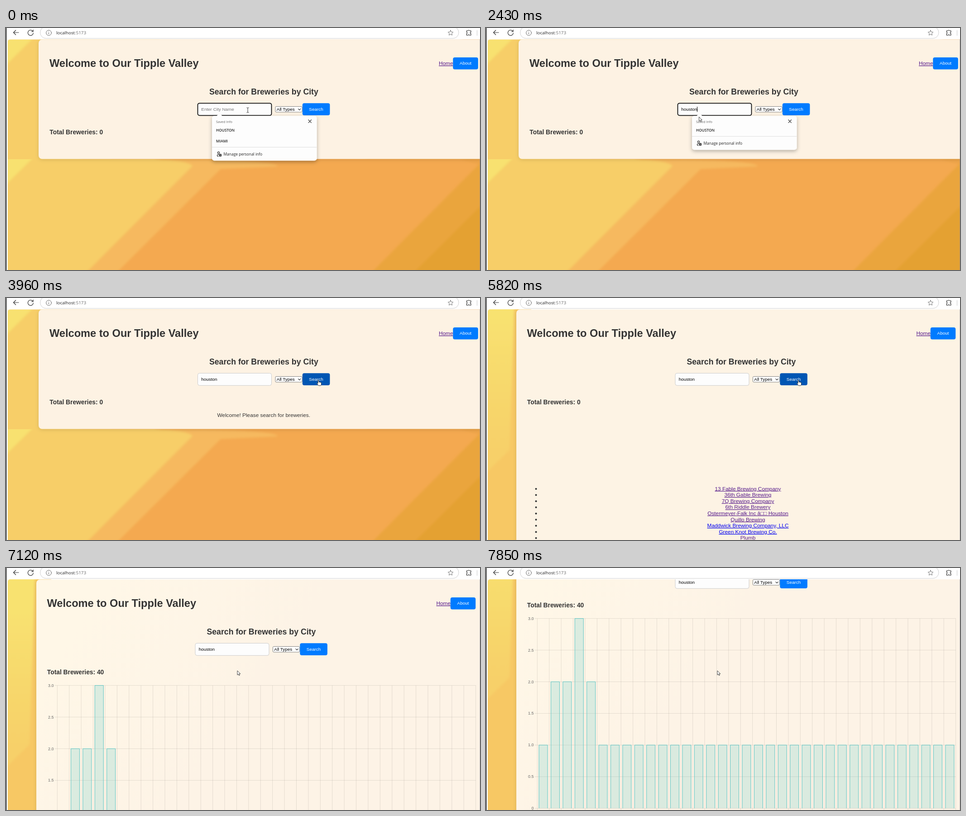
Animation of 1047x535 px, one loop 8 s. Source, as an HTML page:

```html
<!DOCTYPE html>
<html lang="en">
<head>
<meta charset="utf-8">
<title>Brewery search</title>
<style>
  html, body { margin: 0; width: 100%; height: 100%; overflow: hidden; background: #fff; }
  svg { display: block; width: 100vw; height: 100vh; }
  text { font: 9.9px "Liberation Sans", Arial, sans-serif; fill: #333; white-space: pre; }
  .h1 { font-size: 23.6px; font-weight: bold; }
  .h2 { font-size: 17.7px; font-weight: bold; }
  .h3 { font-size: 13.8px; font-weight: bold; }
  .body { font-size: 11.83px; }
  .mid { text-anchor: middle; }
  .link { text-decoration: underline; fill: #551a8b; }
  .new { fill: #0000ee; }
  .form { fill: #000; }
  .btn { fill: #fff; text-anchor: middle; }
  .tick { font-size: 8.85px; fill: #666; text-anchor: end; }
  .ui { font-family: "Open Sans", "Noto Sans", sans-serif; font-size: 8.45px; fill: #222; }
  .strong { font-size: 8.3px; font-weight: 600; }
  .line { fill: none; stroke: #333; stroke-width: 1.2; stroke-linecap: round; stroke-linejoin: round; }
  #bars path { fill: #4bc0c0; fill-opacity: .2; stroke: #4bc0c0; stroke-width: .9; }
</style>
</head>
<body>
<svg viewBox="0 0 1047 535" preserveAspectRatio="none">
  <defs>
    <clipPath id="view"><path d="M4 535V31q0-6 6-6H1047V535z"/></clipPath>
    <clipPath id="tileClip"><path d="M4 290H1047V554.5H4z"/></clipPath>
    <filter id="soft" x="-10%" y="-10%" width="120%" height="120%"><feGaussianBlur stdDeviation="2.5"/></filter>
    <filter id="shade" x="-10%" y="-20%" width="120%" height="150%">
      <feDropShadow dx="0" dy="3" stdDeviation="4" flood-opacity=".3"/>
    </filter>
    <filter id="glow" x="-5%" y="-5%" width="110%" height="110%">
      <feDropShadow dx="0" dy="2" stdDeviation="4" flood-opacity=".12"/>
    </filter>
    <linearGradient id="sun" gradientUnits="userSpaceOnUse" x1="0" y1="90" x2="0" y2="390">
      <stop stop-color="#f8e270"/><stop offset="1" stop-color="#f7d069"/>
    </linearGradient>
    <linearGradient id="paper" gradientUnits="userSpaceOnUse" x1="90" y1="200" x2="450" y2="450">
      <stop stop-color="#fff7e7"/><stop offset="1" stop-color="#fdf3e6"/>
    </linearGradient>
    <g id="tile" clip-path="url(#tileClip)">
      <path d="M4 290H1047V555H4z" fill="#f4a950"/>
      <g filter="url(#soft)">
        <path d="M-20 260H340V290Q600 291 600 306L474 312L210 575H-20z" fill="#f6b95e"/>
        <path d="M-20 260H330V290Q402 293 412 305L143 575H-20z" fill="#f7ce67"/>
        <path d="M-20 260H87L-20 366z" fill="#f8e16f"/>
        <path d="M1000 260H1080V312L1047 303L1005 290z" fill="#efa548"/>
        <path d="M1080 266L773 575H1080z" fill="#eaa53c"/>
        <path d="M1080 362L866 575H1080z" fill="#e4a131"/>
      </g>
    </g>
  </defs>

  <path d="M0 0H1047V535H0z" fill="#fff"/>
  <g clip-path="url(#view)">
    <g id="shortPage">
      <use href="#tile" y="-264.5"/><use href="#tile"/>
      <rect x="72" y="25.5" width="990" height="264" rx="8" fill="#fdf2e3" filter="url(#glow)"/>
    </g>
    <g id="scroller">
      <g id="tallPage">
        <g id="strip">
          <path d="M0-80H100V900H0z" fill="#f7c864"/>
          <path d="M-20-80H66L64 25L52 390L-20 460z" fill="url(#sun)" filter="url(#soft)"/>
        </g>
        <rect id="sheet" x="67" y="25.5" width="1000" height="900" rx="8" filter="url(#glow)"/>
      </g>
      <g id="content">
        <text class="h1" x="96" y="86">Welcome to Our Tipple Valley</text>
        <text class="body link" x="956" y="82">Home</text>
        <rect x="987.3" y="65" width="55.5" height="26.6" rx="4" fill="#007bff"/>
        <text class="btn" x="1015" y="81">About</text>
        <text class="h2 mid" x="569.4" y="147">Search for Breweries by City</text>
        <rect id="field" x="423.5" y="166.3" width="163" height="27" rx="4"/>
        <text id="typed" x="431.3" y="183"></text>
        <path id="caret" d="M466.5 174V185.5" stroke="#000"/>
        <rect x="595" y="173.5" width="59" height="12.5" rx="2" fill="#fff" stroke="#767676" stroke-width=".9"/>
        <text class="form" x="597.8" y="183">All Types</text>
        <path class="line" d="M645.5 178.7l2.6 2.6l2.6-2.6" stroke-width="1.4"/>
        <rect id="button" x="654.8" y="166.3" width="60.6" height="26.6" rx="4"/>
        <text class="btn" x="685" y="183">Search</text>
        <text class="h3" id="total" x="96.3" y="235"></text>
        <text class="body mid" id="hint" x="569.2" y="262.5">Welcome! Please search for breweries.</text>
      </g>
      <g id="list"></g>
      <g id="chart"><path id="grid" fill="none" stroke="#000" stroke-opacity=".1"/><g id="bars"></g></g>
    </g>
  </g>

  <g id="popup">
    <path d="M464 196l6-6h3l6 6z" fill="#fff"/>
    <rect id="card" x="455" y="194.3" width="231.5" rx="5" fill="#fdfdfd" filter="url(#shade)"/>
    <path d="M464 196l6-6h3l6 6z" fill="#fdfdfd"/>
    <rect id="hover" x="459" y="214" width="224" height="23" rx="3" fill="#e9e7e4"/>
    <text class="ui" x="464" y="210" style="font-size:7.4px;fill:#666">Saved Info</text>
    <path class="line" d="M668 203l6.4 6.4m0-6.4l-6.4 6.4" stroke-width="1"/>
    <text class="ui strong" x="464" y="229">HOUSTON</text>
    <text class="ui strong" id="second" x="464" y="252.5">MIAMI</text>
    <g id="foot">
      <path d="M455 263.5H686.5" stroke="#dedede"/>
      <circle class="line" cx="469.5" cy="275.8" r="2.1"/>
      <path class="line" d="M469 284q-3-.5-2.5-3q.5-1.300 3-1.300"/>
      <rect x="470.5" y="278.500" width="5.500" height="5.500" rx="1" fill="#222"/>
      <path d="M471.800 280.600h3m-3 1.600h3" stroke="#fff" stroke-width=".7"/>
      <text class="ui" x="480.500" y="281.700">Manage personal info</text>
    </g>
  </g>

  <!-- browser bar -->
  <path d="M0 0H1.300V535H0z" fill="#222"/>
  <path d="M1046.500 25V535" stroke="#889" stroke-opacity=".4"/>
  <path class="line" d="M28 10H16.500m5-5l-5 5l5 5"/>
  <path class="line" d="M59.500 7.500A6 6 0 1 0 60.300 11M60 4.200V8h-3.800"/>
  <rect x="75.500" y="-3" width="924.500" height="26" rx="13" fill="#fff" stroke="#cfcfcf"/>
  <circle class="line" cx="94.500" cy="10.700" r="5.800" style="stroke:#666;stroke-width:1"/>
  <path d="M94.500 10v3.800m0-6.300v1.200" stroke="#666"/>
  <text class="ui" x="111" y="14" style="font-size:9.800px">localhost<tspan fill="#6b6b6b">:5173</tspan></text>
  <path id="star" class="line" style="stroke:#777;stroke-width:1"/>
  <path class="line" d="M1017.500 6h3q1.700-2.500 3.400 0h3v3.200q-3.400 1.600 0 3.200V16h-3q-1.700-2.400-3.400 0h-3v-3.500q2.500-1.700 0-3.400z"/>
  <path d="M1040.500 5V17" stroke="#ccc"/>

  <g id="cursor">
    <path id="beam" d="M-2.500-5.500q2.500 0 2.500 1.500q0-1.500 2.500-1.500M0-4V4M-2.500 5.500q2.500 0 2.500-1.500q0 1.500 2.500 1.500" fill="none" stroke="#333"/>
    <path id="arrow" d="M.5.500V10l2.200-2l1.500 3.200l1.600-.7l-1.500-3.100h3z" fill="#fff" stroke="#333" stroke-width=".9"/>
    <path id="hand" d="M3 8V1.300q1-1.200 2 0V5q1.300-.8 2 .3q1.300-.6 1.900.4q1.500-.3 1.600 1v3q-.2 1.800-1.300 3H4.500Q3 10.500.7 8.300Q.8 6.800 3 8z" fill="#fff" stroke="#222" stroke-width=".9"/>
  </g>
</svg>
<script>
const $ = id => document.getElementById(id);
const set = (id, attrs) => { for (const k in attrs) $(id).setAttribute(k, attrs[k]); };
const show = (id, on) => set(id, { display: on ? "inline" : "none" });
const LOOP = 8000, SEARCHED = 5820, CHARTED = 5950;

// chart geometry
const COUNT = 35, LEFT = 113.3, STEP = 26.41, ZERO = 679.3, UNIT = 139.9;
const counts = [1, 2, 2, 3, 2];

// stepped timelines: [start, value...]
const typing = [[0, ""], [610, "h"], [750, "ho"], [880, "hou"], [1030, "hous"], [1170, "houst"], [1290, "houston"]];
const caretOn = [[0, 0], [260, 1], [1870, 0], [2430, 1], [2880, 0]];
const fade = [[0, 1], [2880, .8], [3010, .2], [3140, 0]];
const pointer = [
  [0, "beam", 534, 181.5], [2030, "beam", 516, 173], [2160, "beam", 500, 167],
  [2300, "beam", 483, 182], [2430, "arrow", 470, 196], [2570, "arrow", 750, 232],
  [2720, "arrow", 761, 236], [3010, "arrow", 760, 235], [3140, "arrow", 753, 230],
  [3270, "arrow", 741, 223], [3410, "arrow", 716, 201], [3560, "hand", 704, 192],
  [3690, "hand", 694, 186], [3820, "hand", 687, 183], [3960, "hand", 686, 181],
  [6330, "hand", 682, 185], [6460, "arrow", 668, 203], [6590, "arrow", 640, 218],
  [6710, "arrow", 606, 230], [6830, "arrow", 575, 235], [6980, "arrow", 510.5, 226.500]
];
const scrolling = [[0, 0], [7250, 5], [7390, 69], [7660, 147], [7850, 148]];
const growth = [CHARTED, 6140, 6330, 6460, 6590, 6710, 6830].map(t => [t, t]);
const at = (line, t) => line.findLast(s => s[0] <= t) || line[0];

const breweries = [
  "13 Fable Brewing Company", "36th Gable Brewing", "7Q Brewing Company", "6th Riddle Brewery",
  "Ostermeyer-Falk Inc â□□ Houston", "Quillo Brewing", "Maddwick Brewing Company, LLC",
  "Green Knot Brewing Co.", "Plumb"
];

function build() {
  $("list").innerHTML = breweries.map((name, i) => {
    const y = 421.5 + 13.6 * i;
    const fresh = i === 6 || i === 7 ? "new" : "";
    return `<circle cx="110.500" cy="${y + .5}" r="2" fill="#333"/>
      <text class="body mid link ${fresh}" x="578.500" y="${y + 4}">${name}</text>`;
  }).join("");

  const right = LEFT + COUNT * STEP, top = ZERO - 3 * UNIT;
  let grid = "", labels = "";
  for (let i = 0; i <= COUNT; i++) grid += `M${LEFT + i * STEP} ${top}V${ZERO + 6}`;
  for (let v = 0; v <= 3; v += .5) {
    const y = ZERO - v * UNIT;
    grid += `M${LEFT - 6} ${y}H${right}`;
    labels += `<text class="tick" x="105.300" y="${y + 3}">${v ? v.toFixed(1) : 0}</text>`;
  }
  set("grid", { d: grid });
  $("chart").insertAdjacentHTML("beforeend", labels);
  $("bars").innerHTML = "<path/>".repeat(COUNT);

  let star = "";
  for (let i = 0; i < 10; i++) {
    const r = i % 2 ? 2.8 : 6, a = i * Math.PI / 5;
    star += `${i ? "L" : "M"}${982 + r * Math.sin(a)} ${11 - r * Math.cos(a)}`;
  }
  set("star", { d: star + "z" });
}

function drawBars(t) {
  const p = Math.min(1, (at(growth, t)[1] - 5810) / 1000);
  const ease = 1 - (1 - p) ** 4;
  [...$("bars").children].forEach((bar, i) => {
    const x = LEFT + STEP * (i + .14), y = ZERO - (counts[i] || 1) * UNIT * ease;
    bar.setAttribute("d", `M${x} ${ZERO}V${y}h${STEP * .72}V${ZERO}`);
  });
}

function drawPopup(t) {
  const alpha = at(fade, t)[1], full = t < 610;
  show("popup", alpha > 0);
  set("popup", {
    opacity: alpha,
    transform: alpha < 1 ? "translate(570.700 231) scale(.986) translate(-570.700 -231)" : ""
  });
  set("card", { height: full ? 99 : 75 });
  set("foot", { transform: `translate(0 ${full ? 0 : -24})` });
  show("second", full);
  show("hover", t >= 2570);
}

function draw(t) {
  const searched = t >= SEARCHED, charted = t >= CHARTED;
  const focused = t < 2880, text = at(typing, t)[1];

  show("shortPage", !searched);
  show("tallPage", searched);
  show("hint", !searched);
  show("list", searched && !charted);
  show("chart", charted);
  set("strip", { transform: `translate(0 ${charted ? 0 : -54})` });
  set("sheet", { fill: charted ? "url(#paper)" : "#fdf3e4" });
  set("content", { transform: `translate(${searched ? -5.5 : 0} 0)` });
  set("scroller", { transform: `translate(0 ${-at(scrolling, t)[1]})` });
  $("total").textContent = "Total Breweries: " + (charted ? 40 : 0);

  set("field", { fill: "#fdfdfd", stroke: focused ? "#101010" : "#ccc", "stroke-width": focused ? 1.8 : 1 });
  $("typed").textContent = text || "Enter City Name";
  $("typed").style.fill = text ? "#000" : "#757575";
  show("caret", at(caretOn, t)[1]);
  set("caret", { transform: `translate(${text ? $("typed").getComputedTextLength() - 35.2 : -35} 0)` });
  set("button", { fill: t >= 3560 && t < 6460 ? "#0056b3" : "#007bff" });

  drawPopup(t);
  if (charted) drawBars(t);

  const [, shape, x, y] = at(pointer, t);
  for (const id of ["beam", "arrow", "hand"]) show(id, id === shape);
  set("cursor", { transform: `translate(${x} ${y})` });
}

build();
const start = performance.now();
(function frame() {
  draw((performance.now() - start) % LOOP);
  requestAnimationFrame(frame);
})();
</script>
</body>
</html>
```
